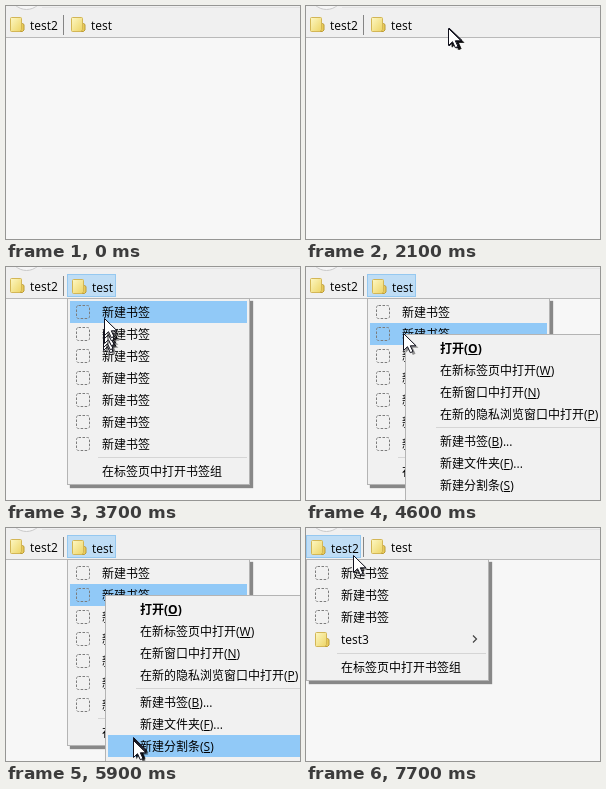
Animation, 294 px wide and 233 px high, one loop 8 s. Source, as an HTML page:

```html
<!DOCTYPE html>
<html lang="zh-CN">
<head>
<meta charset="utf-8">
<title>Bookmark menus</title>
<style>
  html, body { margin: 0; width: 100%; height: 100%; overflow: hidden; }
  body { background: #f7f7f7; }
  #stage {
    position: relative; width: 294px; height: 233px; overflow: hidden;
    font: 12px/22px "Open Sans", "Noto Sans CJK SC", "Noto Sans CJK", sans-serif;
    color: #000; white-space: nowrap; cursor: default;
  }
  #stage * { box-sizing: border-box; }
  #stage svg, .bar, .button, .menu, .row, .line, .label { position: absolute; }
  svg { overflow: visible; }
  .bar { left: 0; top: 0; width: 294px; height: 32px; background: #f0f0f0; border-bottom: 1px solid #b9b9b9; }
  .bar .edge { position: absolute; left: 36px; right: 0; top: 1px; height: 1px; background: #e3e3e3; }
  .bar .split { position: absolute; left: 57px; top: 9px; width: 1px; height: 20px; background: #858585; }
  .button { top: 7px; height: 23px; border: 1px solid transparent; }
  .button.hover { background: #d6e9f8; border-color: #b4d6f2; }
  .button.open { background: #bfddf5; border-color: #95c8f0; }
  .button .in { position: absolute; left: -1px; top: -1px; }
  .button.open .in { transform: translate(1px, 1px); }
  .menu { background: #f1f1f1; border: 1px solid #b4b4b4; box-shadow: 3px 3px 1px rgba(0, 0, 0, .45); visibility: hidden; }
  .menu.shown { visibility: visible; }
  .row { left: 2px; right: 2px; height: 22px; }
  .row.lit { background: #91c9f7; }
  .row.strong { font-weight: 700; }
  .line { left: 30px; right: 2px; height: 1px; background: #d5d5d5; }
</style>
</head>
<body>
<div id="stage">
  <svg width="0" height="0">
    <defs>
      <linearGradient id="paper" x2="1" y2="1">
        <stop offset="0" stop-color="#fdf8c4"/>
        <stop offset="1" stop-color="#edd465"/>
      </linearGradient>
      <g id="folder">
        <path d="M10 6.5h2.5l1.5 1v5.500l-1.500 1.500H9z" fill="#e9cb58" stroke="#bb9b38"/>
        <path d="M.5 1.500q0-1 1-1h9q1 0 1 1v11l-1.500 2H1.500q-1 0-1-1z" fill="url(#paper)" stroke="#d3b656"/>
      </g>
      <rect id="blank" x=".5" y=".5" width="13" height="13" rx="2" fill="none" stroke="#7c7c7c" stroke-dasharray="2.500 1.500"/>
      <g id="arrow">
        <path d="M3 3V19.500L7 15.700L9.800 22L12.500 20.800L9.800 14.800H15.500Z" opacity=".4"/>
        <path d="M.5 .5V17.500L4.500 13.700L7.300 19.700L10 18.500L7.300 12.800H13Z" fill="#fff" stroke="#10101c"/>
      </g>
    </defs>
  </svg>
  <div class="bar">
    <div class="edge"></div>
    <svg width="40" height="5"><circle cx="20.500" cy="-13" r="16.500" fill="#f6f6f6" stroke="#c9c9c9"/></svg>
    <div class="split"></div>
  </div>
</div>
<script>
const stage = document.getElementById('stage');
const LOOP = 8000, STEP = 100, ROW = 22, GAP = 5;
const TRAIL = 5, TRAIL_STEP = 25;
const ENTER = 100;

// Eased pointer moves: start, end, and where the tip arrives
const home = [268, 70];
const moves = [
  [100, 900, 85, 19],
  [1300, 1900, 143, 22],
  [2060, 2500, 80, 20],
  [2900, 3500, 97, 75],
  [3500, 3800, 98, 42],
  [4000, 4300, 97, 66],
  [4700, 5000, 125, 96],
  [5000, 5590, 126, 205],
  [5600, 6000, 127, 213],
  [6000, 6500, 127, 81],
  [6500, 7400, 47, 27]
];

function tipAt(t) {
  let [x, y] = home;
  for (const [from, to, toX, toY] of moves) {
    const k = Math.min(Math.max((t - from) / (to - from), 0), 1);
    const ease = k * k * (3 - 2 * k);
    x += (toX - x) * ease;
    y += (toY - y) * ease;
    if (k < 1) break;
  }
  return [Math.round(x), Math.round(y)];
}

function add(parent, cls, css, html = '') {
  const el = document.createElement('div');
  el.className = cls;
  Object.assign(el.style, css);
  el.innerHTML = html;
  return parent.appendChild(el);
}

const icon = (id, x, y) =>
  `<svg width="16" height="16" style="left:${x}px;top:${y}px"><use href="#${id}"/></svg>`;
const label = (text, x, y) =>
  `<span class="label" style="left:${x}px;top:${y}px">${text}</span>`;

function makeButton(x, w, text) {
  const el = add(stage, 'button', { left: x + 'px', width: w + 'px' },
    `<div class="in">${icon('folder', 4, 4)}${label(text, 24, 2)}</div>`);
  return { el, x, w };
}

// Items: null is a separator, otherwise { text, icon, strong, sub }
function makeMenu(x, y, w, items) {
  const el = add(stage, 'menu', { left: x + 'px', top: y + 'px', width: w + 'px' });
  const rows = [];
  let top = 3;
  for (const item of items) {
    if (!item) {
      add(el, 'line', { top: top + 1 + 'px' });
      top += GAP;
      continue;
    }
    let html = label(item.text, 32, 1);
    if (item.icon) html += icon(item.icon, 6, 4);
    if (item.sub) {
      html += '<svg width="6" height="9" style="left:163px;top:7px">' +
        '<path d="M1 .5l3.500 3.500l-3.500 3.500" fill="none" stroke="#444" stroke-width="1.200"/></svg>';
    }
    const row = add(el, item.strong ? 'row strong' : 'row', { top: top - 1 + 'px' }, html);
    rows.push({ el: row, y: y + top });
    top += item.sub ? ROW + 1 : ROW;
  }
  el.style.height = top + 3 + 'px';
  return { el, x, w, rows };
}

const blank = { text: '新建书签', icon: 'blank' };
const openAll = { text: '在标签页中打开书签组' };
const keyed = (text, key, end = '') => ({ text: `${text}(<u>${key}</u>)${end}` });

const test2 = makeButton(0, 55, 'test2');
const test = makeButton(61, 49, 'test');
const listMenu = makeMenu(61, 31, 183, [...Array(7).fill(blank), null, openAll]);
const sideMenu = makeMenu(0, 31, 183,
  [blank, blank, blank, { text: 'test3', icon: 'folder', sub: true }, null, openAll]);
// The last, empty row runs off the stage
const contextMenu = makeMenu(99, 67, 220, [
  { ...keyed('打开', 'O'), strong: true },
  keyed('在新标签页中打开', 'W'),
  keyed('在新窗口中打开', 'N'),
  keyed('在新的隐私浏览窗口中打开', 'P'),
  null,
  keyed('新建书签', 'B', '...'),
  keyed('新建文件夹', 'F', '...'),
  keyed('新建分割条', 'S'),
  { text: '' }
]);

const pointers = Array.from({ length: TRAIL }, () => {
  stage.insertAdjacentHTML('beforeend', '<svg width="18" height="24"><use href="#arrow"/></svg>');
  return stage.lastElementChild;
});

const within = (t, from, to) => t >= from && t < to;

function setButton(button, open, canHover, [x, y]) {
  const over = within(x, button.x, button.x + button.w) && within(y, 7, 30);
  button.el.classList.toggle('open', open);
  button.el.classList.toggle('hover', !open && canHover && over);
}

function setMenu(menu, shown, [x, y]) {
  menu.el.classList.toggle('shown', shown);
  for (const row of menu.rows) {
    const over = within(x, menu.x + 3, menu.x + menu.w - 3) && within(y, row.y, row.y + ROW);
    row.el.classList.toggle('lit', shown && over);
  }
}

function draw(t) {
  const tip = tipAt(t);
  const listOpen = within(t, 900, 1900) || within(t, 2700, 6900);
  const contextOpen = within(t, 4600, 6900);
  const sideOpen = t >= 7700;
  const idle = t >= ENTER && (!listOpen || t < 1000);

  setButton(test, listOpen && t >= 1000, idle, tip);
  setButton(test2, sideOpen, idle, tip);
  // The clicked row stays lit under the context menu
  setMenu(listMenu, listOpen, contextOpen ? tipAt(4600) : tip);
  setMenu(contextMenu, contextOpen, tip);
  setMenu(sideMenu, sideOpen, [-1, -1]);

  pointers.forEach((el, i) => {
    const [x, y] = tipAt(t - (TRAIL - 1 - i) * TRAIL_STEP);
    const newest = i === TRAIL - 1;
    const apart = x !== tip[0] || y !== tip[1];
    el.style.left = x + 'px';
    el.style.top = y + 'px';
    el.style.visibility = t >= ENTER && (newest || apart) ? 'visible' : 'hidden';
  });
}

const start = performance.now();
function frame() {
  const t = (performance.now() - start) % LOOP;
  draw(Math.floor(t / STEP) * STEP);
  requestAnimationFrame(frame);
}
draw(0);
requestAnimationFrame(frame);
</script>
</body>
</html>
```
